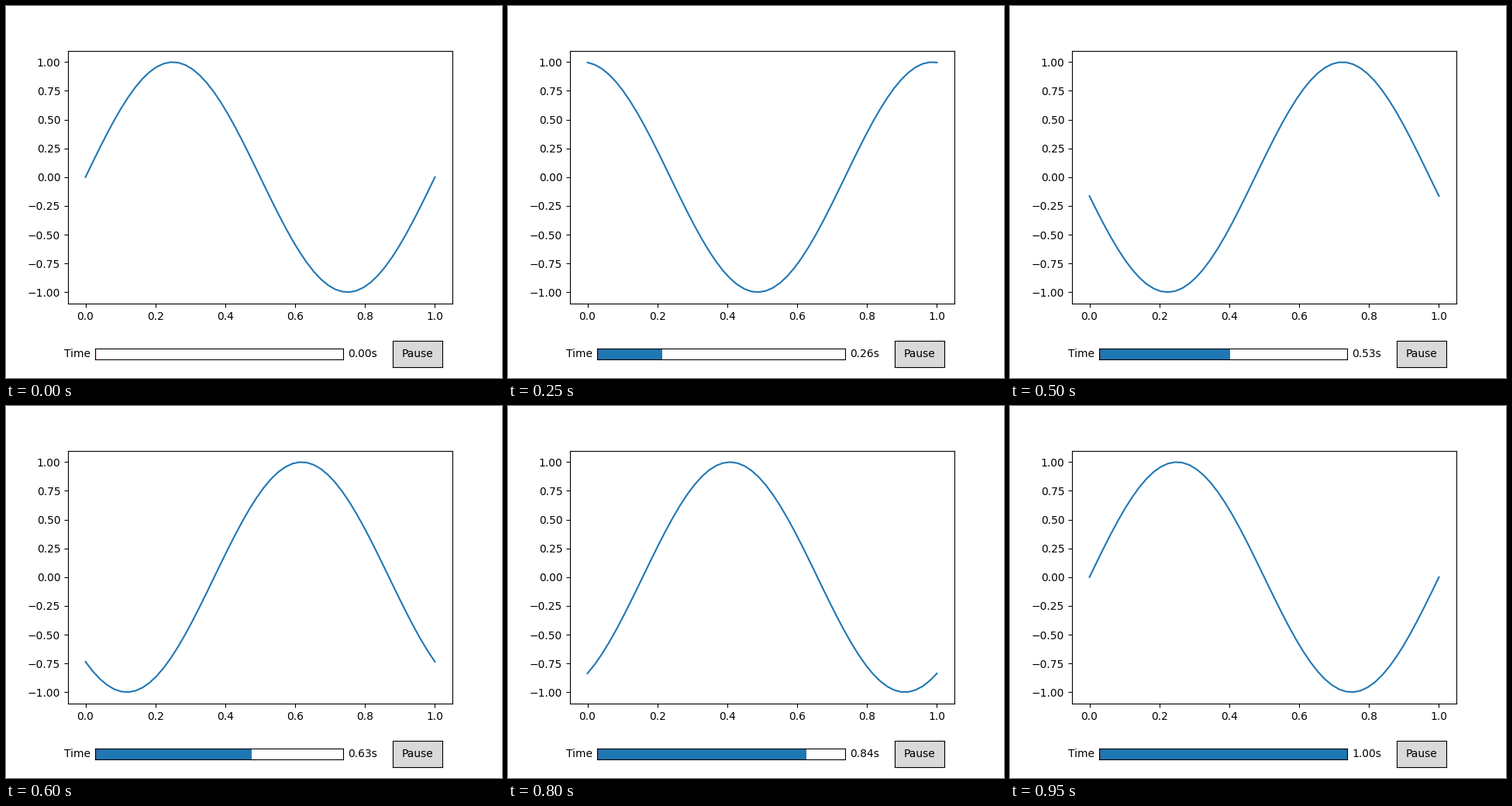
A matplotlib script that plays this animation: 640 by 480 pixels, repeating every 1 s.

```python
import numpy as np
import matplotlib.pyplot as plt
from matplotlib.animation import FuncAnimation
from matplotlib.patches import Rectangle

FRAMES = 20
INTERVAL = 50  # ms

plt.rcParams["font.family"] = "DejaVu Sans"
plt.rcParams["font.size"] = 10

x = np.linspace(0, 1, 50)
times = np.linspace(0, 1, FRAMES)


def wave(t):
    return np.sin(2 * np.pi * (x + t))


def widget_axes(rect, color="white"):
    ax = fig.add_axes(rect, facecolor=color)
    ax.set(xlim=(0, 1), ylim=(0, 1), xticks=[], yticks=[])
    return ax


def label(ax, pos, text, align):
    return ax.text(pos, 0.5, text, transform=ax.transAxes,
                   ha=align, va="center")


fig = plt.figure(figsize=(6.4, 4.8), dpi=100)

plot_ax = fig.add_axes([0.125, 0.2, 0.775, 0.68])
curve, = plot_ax.plot(x, wave(0), color="C0", lw=1.5)
# Keep the limits that fit the starting curve.
plot_ax.set_xlim(plot_ax.get_xlim())
plot_ax.set_ylim(plot_ax.get_ylim())

slider_ax = widget_axes([0.18, 0.05, 0.5, 0.03])
bar = slider_ax.add_patch(Rectangle((0, 0), 0, 1, facecolor="C0", lw=1))
slider_ax.axvline(0, color="red", lw=1)
label(slider_ax, -0.02, "Time", "right")
value = label(slider_ax, 1.02, "0.00s", "left")

button_ax = widget_axes([0.78, 0.03, 0.1, 0.07], "0.85")
label(button_ax, 0.5, "Pause", "center")


def update(frame):
    t = times[frame]
    curve.set_ydata(wave(t))
    bar.set_width(t)
    value.set_text(f"{t:.2f}s")
    return curve, bar, value


anim = FuncAnimation(fig, update, frames=FRAMES, interval=INTERVAL,
                     repeat=True, repeat_delay=0, blit=False)
plt.show()
```
